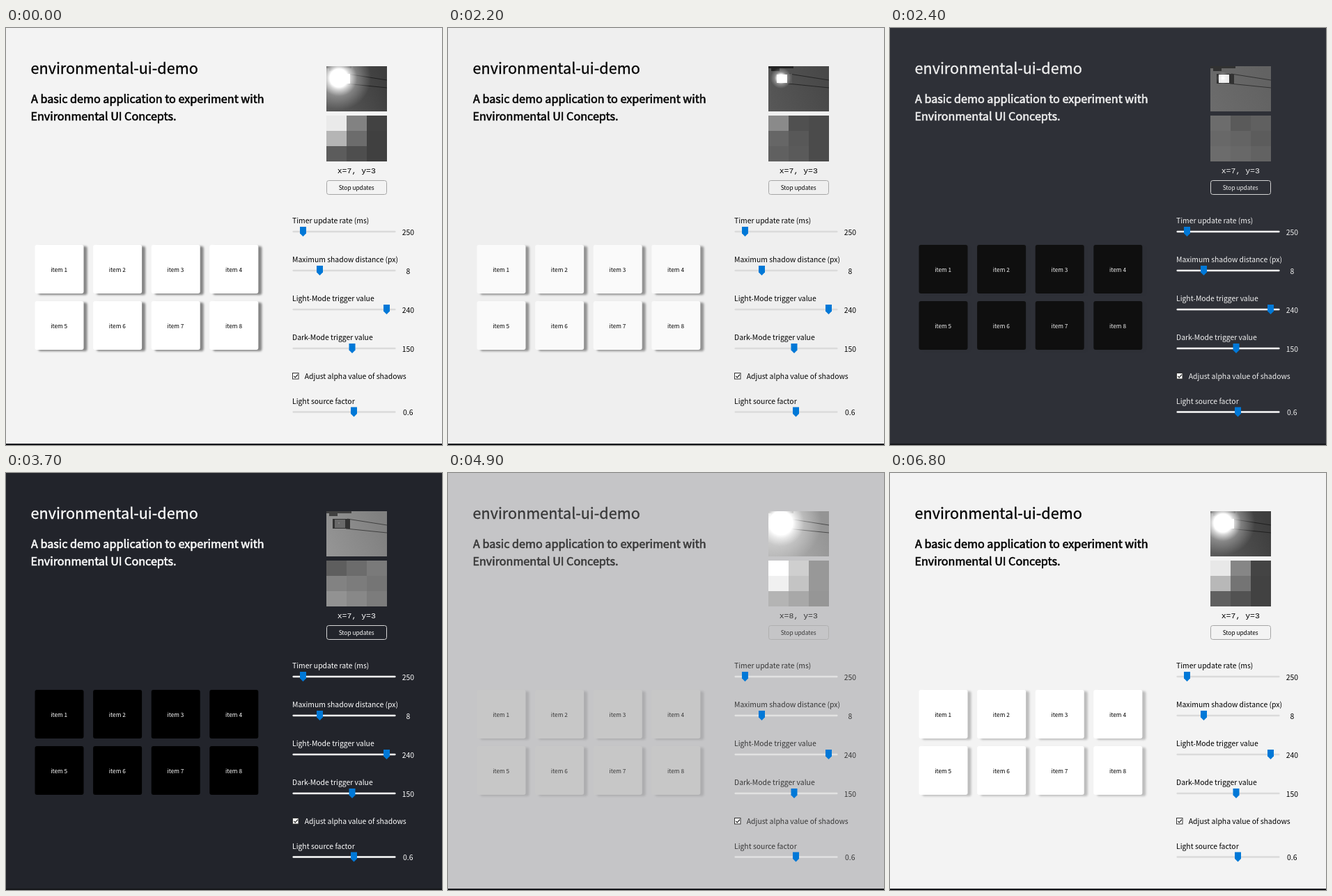
Recreate the animation shown at these times as an HTML page with a canvas. Size 626 by 600 pixels, loop 7100 ms.

```html
<!DOCTYPE html>
<html lang="en">
<head>
<meta charset="utf-8">
<title>environmental-ui-demo</title>
<style>
  html, body { margin: 0; width: 100%; height: 100%; overflow: hidden; }
  body { position: relative; background: var(--page); }
  svg { position: absolute; left: 0; top: 0; }
  canvas { position: absolute; left: 460px; top: 55px; }
  text {
    font-family: "Noto Sans CJK SC", "Noto Sans CJK JP", "Noto Sans CJK", "Noto Sans", sans-serif;
    font-size: 10.4px; fill: var(--ink); white-space: pre;
  }
  .mid { text-anchor: middle; }
  .small { font-size: 8.3px; }
  .title { font-size: 21.6px; stroke: var(--ink); stroke-width: .3px; }
  .lead { font-size: 16.15px; stroke: var(--ink); stroke-width: .6px; }
  .mono { font-family: "Liberation Mono", "Courier New", monospace; font-size: 11.5px; }
  .track { fill: var(--track); }
  .thumb { fill: #0078d7; }
  .card { fill: var(--card); }
  .button { fill: none; stroke: var(--border); }
  #cards { filter: drop-shadow(var(--dx) 2.2px 1.5px var(--shadow)); }
</style>
</head>
<body>
<svg id="stage" width="626" height="600" viewBox="0 0 626 600"></svg>
<canvas id="camera" width="87" height="137"></canvas>
<script>
const LOOP = 7100;
const stage = document.getElementById('stage');
const ctx = document.getElementById('camera').getContext('2d');

// ---- static layout ----
const label = (x, y, cls, s, id = '') => `<text x="${x}" y="${y}" class="${cls}" id="${id}">${s}</text>`;

const slider = ([name, value, y, thumb]) =>
  label(411, y - 12, '', name) +
  `<rect class="track" x="411.5" y="${y - 1.2}" width="148" height="2.4" rx="1"/>` +
  `<path class="thumb" d="M${thumb - 4.5} ${y - 7}h9v9.5l-4.5 4.5l-4.5-4.5z"/>` +
  label(577.3, y + 4.9, 'mid', value);

const sliders = [
  ['Timer update rate (ms)', '250', 293, 426.5],
  ['Maximum shadow distance (px)', '8', 349, 450.5],
  ['Light-Mode trigger value', '240', 405, 546.5],
  ['Dark-Mode trigger value', '150', 461, 497],
  ['Light source factor', '0.6', 552.5, 499.5]
];

const cards = Array.from({ length: 8 }, (_, i) => ({
  name: 'item ' + (i + 1),
  x: 41.5 + (i % 4) * 83.6,
  y: i < 4 ? 312 : 393
}));

stage.innerHTML =
  label(35.5, 66, 'title', 'environmental-ui-demo') +
  label(36, 108.3, 'lead', 'A basic demo application to experiment with') +
  label(35.5, 133, 'lead', 'Environmental UI Concepts.') +
  '<g id="cards">' +
  cards.map(c => `<rect class="card" x="${c.x}" y="${c.y}" width="70" height="70" rx="3"/>`).join('') +
  '</g>' +
  cards.map(c => label(c.x + 34.7, c.y + 39.4, 'mid small', c.name)).join('') +
  label(503.3, 209, 'mono mid', '', 'offset') +
  '<rect class="button" x="460.5" y="219.5" width="86" height="20" rx="3"/>' +
  label(503.2, 233, 'mid small', 'Stop updates') +
  sliders.map(slider).join('') +
  '<rect x="411.5" y="496.5" width="8.5" height="8.5" fill="#fff" stroke="#333"/>' +
  '<path d="M413.3 500.8l2 2.1l3.6-4.2" fill="none" stroke="#222" stroke-width="1.2"/>' +
  label(428.8, 505.3, '', 'Adjust alpha value of shadows') +
  '<rect y="598" width="626" height="2" fill="#15161a"/>';
const offsetText = document.getElementById('offset');

// ---- webcam exposure over time ----
// grid: 3x3 brightness; wall: left and right; lamp: housing and lens; core/glow: radii
const lit = { grid: [234, 130, 66, 181, 108, 64, 92, 78, 64], wall: [92, 62], lamp: [255, 255], core: [13], glow: [46], shadow: [.45], dx: [7] };
const fading = { grid: [138, 80, 75, 102, 88, 75, 96, 90, 75], wall: [88, 72], lamp: [90, 255], core: [5], glow: [15], shadow: [.42], dx: [7] };
const dim = { grid: [108, 90, 96, 104, 100, 92, 108, 104, 98], wall: [108, 98], lamp: [50, 235], core: [1], glow: [9], shadow: [.3], dx: [7] };
const off = { grid: [94, 108, 122, 130, 124, 117, 146, 136, 124], wall: [150, 128], lamp: [50, 105], core: [0], glow: [1], shadow: [.15], dx: [7] };
const flare = { grid: [255, 207, 152, 240, 196, 152, 180, 168, 150], wall: [180, 148], lamp: [255, 255], core: [17], glow: [58], shadow: [.15], dx: [8] };
const settled = { ...lit, grid: [232, 134, 68, 184, 116, 66, 96, 82, 66], shadow: [.22] };

const keys = [
  [0, lit], [1650, lit], [2150, fading], [2400, dim], [3400, off],
  [4400, off], [4650, flare], [5150, flare], [6150, settled], [LOOP, settled]
];

const mix = (a, b, p) => a + (b - a) * p;

function exposureAt(t) {
  const i = Math.max(1, keys.findIndex(k => k[0] > t));
  const [t0, a] = keys[i - 1], [t1, b] = keys[i];
  const p = (t - t0) / (t1 - t0), state = {};
  for (const k in a) state[k] = a[k].map((v, j) => mix(v, b[k][j], p));
  return state;
}

const gray = (v, alpha = 1) => `rgba(${v},${v},${v},${alpha})`;

function line(x0, y0, x1, y1) {
  ctx.beginPath();
  ctx.moveTo(x0, y0);
  ctx.lineTo(x1, y1);
  ctx.stroke();
}

function drawCamera({ grid, wall, lamp, core: [core], glow: [glow] }) {
  ctx.clearRect(0, 0, 87, 137);
  ctx.save();
  ctx.beginPath();
  ctx.rect(0, 0, 87, 65);
  ctx.clip();

  const back = ctx.createLinearGradient(0, 65, 87, 30);
  back.addColorStop(0, gray(wall[0]));
  back.addColorStop(1, gray(wall[1]));
  ctx.fillStyle = back;
  ctx.fillRect(0, 0, 87, 65);

  // ceiling fixture, wires and lamp
  ctx.fillStyle = ctx.strokeStyle = gray(wall[1] * .5);
  ctx.fillRect(0, 0, 36, 3);
  ctx.fillRect(4, 3, 12, 4);
  ctx.lineWidth = 1;
  line(30, 11, 87, 20);
  line(28, 25, 87, 31);
  ctx.fillStyle = gray(lamp[0]);
  ctx.fillRect(9, 11, 25, 14);
  ctx.fillStyle = gray(lamp[1]);
  ctx.fillRect(12, 12, 15, 12);

  const halo = ctx.createRadialGradient(18, 17, core, 18, 17, glow);
  halo.addColorStop(0, gray(255));
  halo.addColorStop(.12, gray(255, .75));
  halo.addColorStop(.4, gray(255, .3));
  halo.addColorStop(1, gray(255, 0));
  ctx.fillStyle = halo;
  ctx.fillRect(0, 0, 87, 65);
  ctx.restore();

  const rows = [71, 93, 115, 137];
  grid.forEach((v, i) => {
    const y = rows[Math.floor(i / 3)];
    ctx.fillStyle = gray(v);
    ctx.fillRect(i % 3 * 29, y, 29, rows[Math.floor(i / 3) + 1] - y);
  });
}

// ---- theme ----
// CSS "ease": cubic-bezier(.25, .1, .25, 1)
function ease(x) {
  if (x <= 0 || x >= 1) return x <= 0 ? 0 : 1;
  const bezier = (a, b, s) => 3 * a * s * (1 - s) ** 2 + 3 * b * s * s * (1 - s) + s ** 3;
  let lo = 0, hi = 1;
  for (let i = 0; i < 20; i++) {
    const s = (lo + hi) / 2;
    if (bezier(.25, .25, s) < x) lo = s; else hi = s;
  }
  return bezier(.1, 1, lo);
}

const lightness = t => t < 4000 ? 1 - ease((t - 2190) / 300) : ease((t - 4686) / 450);

const blend = (dark, light, p) => `rgb(${dark.map((v, i) => Math.round(mix(v, light[i], p)))})`;
const level = v => [v, v, v];

function render(t) {
  const p = lightness(t);
  // the webcam is sampled every 250 ms
  const sample = exposureAt(Math.max(0, Math.floor((t - 150) / 250) * 250 + 150));
  const x = Math.round(sample.dx[0]);
  const vars = {
    page: blend([34, 36, 43], level(243), p),
    ink: blend(level(255), level(0), p),
    card: blend(level(0), level(255), p),
    track: blend(level(255), level(218), p),
    border: blend(level(215), level(165), p),
    shadow: gray(0, exposureAt(t).shadow[0] * p),
    dx: x * .74 + 'px'
  };
  for (const k in vars) document.documentElement.style.setProperty('--' + k, vars[k]);
  offsetText.textContent = `x=${x}, y=3`;
  drawCamera(sample);
}

const start = performance.now();
function tick() {
  render((performance.now() - start) % LOOP);
  requestAnimationFrame(tick);
}
tick();
</script>
</body>
</html>
```
